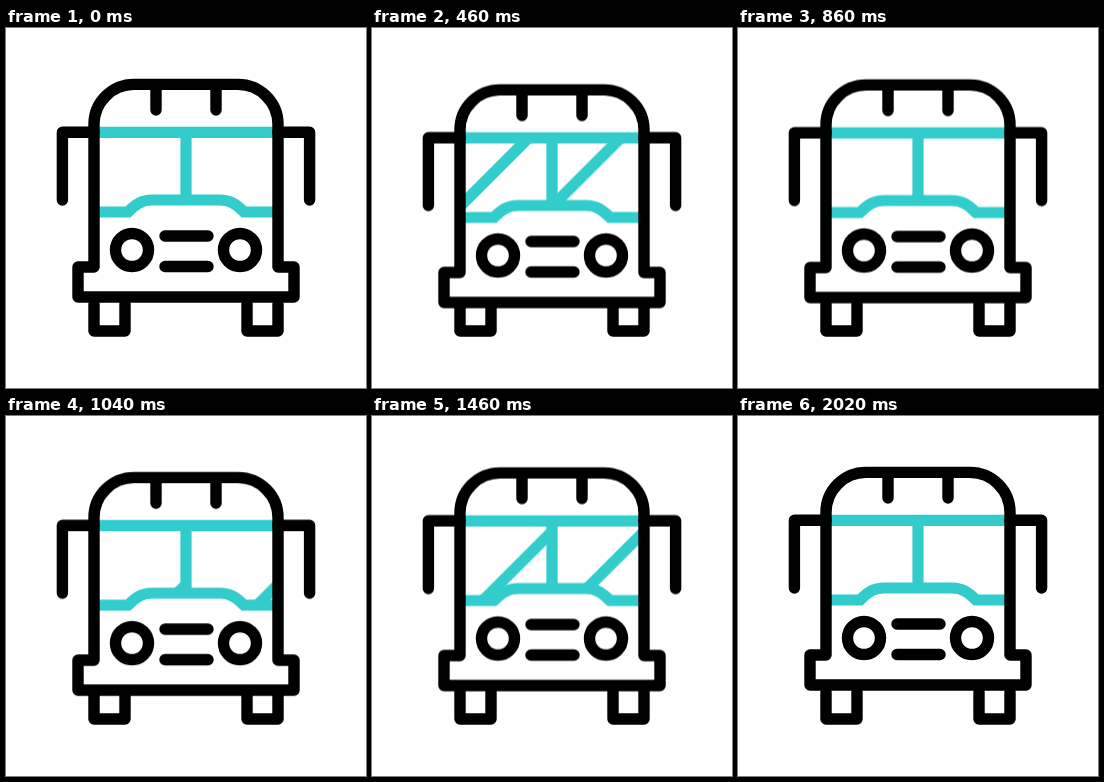
An HTML page for the animation above (2400 ms loop, 360x360 px).

```html
<!DOCTYPE html>
<html lang="en">
<head>
<meta charset="utf-8">
<title>Bus</title>
<style>
  html, body { margin: 0; width: 100%; height: 100%; overflow: hidden; background: #fff; }
  svg { display: block; width: 100vw; height: 100vh; }
  .line { fill: none; stroke: #000; stroke-width: 11.4; stroke-linecap: round; stroke-linejoin: round; }
  .trim { fill: none; stroke: #3cc; stroke-width: 11.2; }
  .bus { animation: bounce 2.4s cubic-bezier(.37, 0, .63, 1) infinite; }
  .shine { animation: sweep 2.4s cubic-bezier(.37, 0, .63, 1) infinite; }

  /* three bounces of 600 ms, with a rest before and after */
  @keyframes bounce {
    0%, 8.333%, 33.333%, 58.333%, 83.333%, 100% { transform: translateY(0); }
    20.833%, 45.833%, 70.833% { transform: translateY(5.7px); }
  }

  /* across the glass, halfway back, and out again */
  @keyframes sweep {
    0%, 8.333% { transform: translateX(281px); }
    33.333% { transform: translateX(462px); }
    58.333% { transform: translateX(385px); }
    83.333%, 100% { transform: translateX(462px); }
  }
</style>
</head>
<body>
<svg viewBox="0 0 360 360">
  <defs>
    <clipPath id="leftPane">
      <path d="M88 104H180V172H146C136 172 130 176 122 184H88Z"/>
    </clipPath>
    <clipPath id="rightPane">
      <path d="M272 104H180V172H214C224 172 230 176 238 184H272Z"/>
    </clipPath>
  </defs>

  <g class="line">
    <path d="M88 276V303H119V276"/>
    <path d="M241 276V303H272V276"/>
  </g>

  <g class="bus">
    <g class="trim">
      <g clip-path="url(#leftPane)">
        <path class="shine" d="M-182 90L-292 200"/>
      </g>
      <g clip-path="url(#rightPane)">
        <path class="shine" d="M-90 90L-200 200"/>
      </g>
      <path d="M88 104.300H272M180 104V172"/>
      <path d="M88 184H122C130 176 136 172 146 172H214C224 172 230 176 238 184H272"/>
    </g>
    <g class="line">
      <path d="M128 56.400H232A40 40 0 0 1 272 96.400V239H288V269H72V239H88V96.400A40 40 0 0 1 128 56.400Z"/>
      <path d="M150 57V82M210 57V82"/>
      <path d="M88 104.300H56.400V172M272 104.300H303.600V172"/>
      <path d="M159 208H202M159 238.500H202"/>
      <circle cx="126" cy="222" r="16.500"/>
      <circle cx="234" cy="222" r="16.500"/>
    </g>
  </g>
</svg>
</body>
</html>
```
